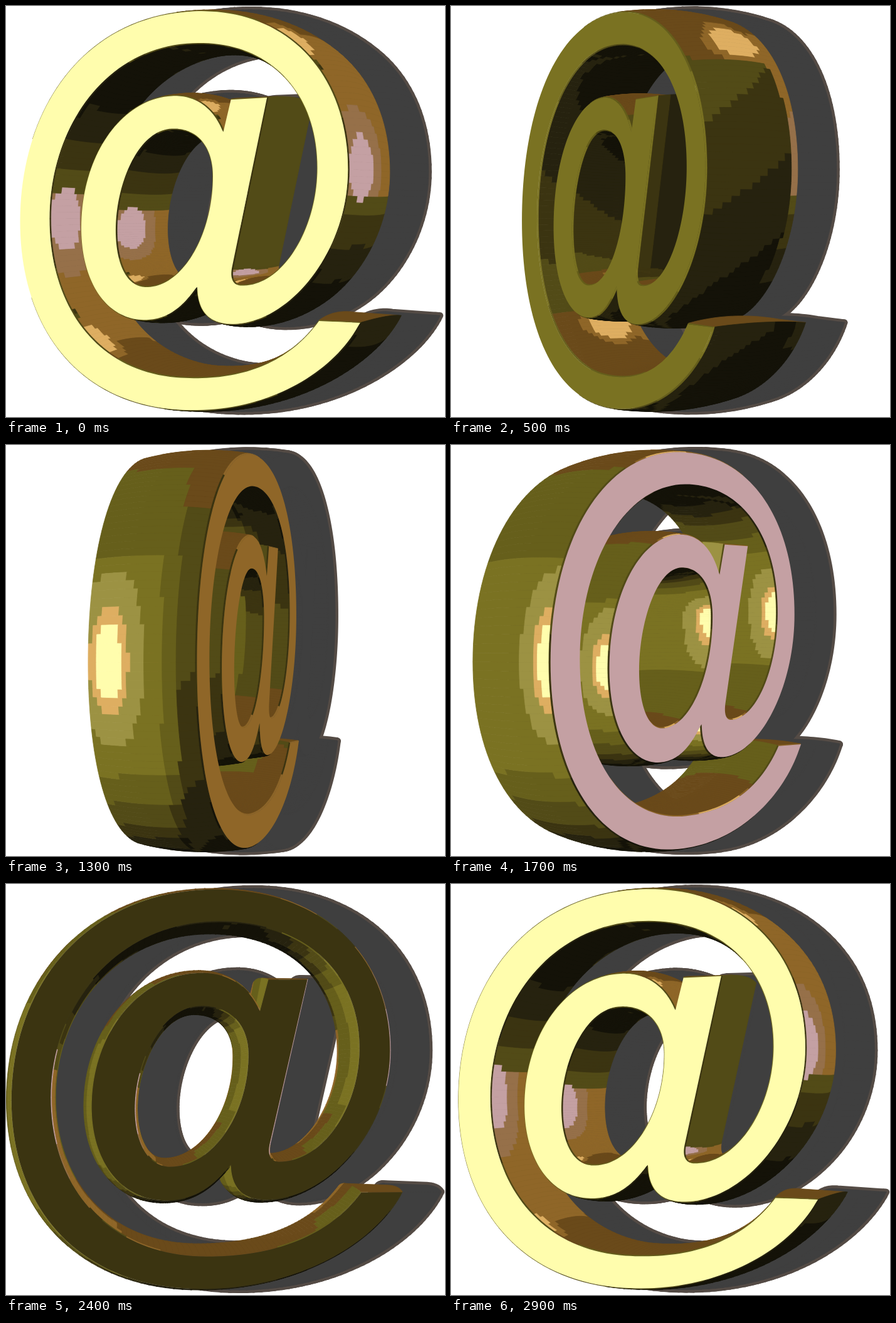
An HTML page with a canvas that plays this animation: 700 px wide and 655 px high, repeating every 3000 ms.

```html
<!DOCTYPE html>
<html lang="en">
<head>
<meta charset="utf-8">
<title>Turning at sign</title>
<style>
html, body { margin: 0; width: 100%; height: 100%; overflow: hidden; background: #fff; }
canvas { display: block; width: 700px; height: 655px; }
</style>
</head>
<body>
<canvas id="stage" width="700" height="655"></canvas>
<script>
const ctx = document.getElementById('stage').getContext('2d');
const RAD = Math.PI / 180;
const CX = 320, CY = 326, EYE = 2300, DEPTH = 80, RIM = 78, BULGE = 8;
const STRIPS = 24, CURVE_STEPS = 40;

// olive ramp from dark to light, then the warm tones
const OLIVE = ['#141208', '#26220f', '#3b3411', '#524b17', '#665f1b', '#7a7222'];
const KHAKI = '#9c9243', GOLD = '#deae61', CREAM = '#fffdad';
const UMBER = '#6a4a1a', BRONZE = '#8f6628', MAUVE = '#967049', PINK = '#c4a0a3';
const SHADE = '#3f3f3f', SHADE_EDGE = '#544b45';

// Outlines as seen with the sign turned by -7 degrees
const BODY = `M566 491 L632 491 C590 572 468 646 312 646 C120 646 8 520 8 345
  C8 160 130 8 335 8 C500 8 613 110 613 265 C613 395 510 504 415 504
  C378 504 359 485 358 448 C330 484 300 505 255 505 C185 505 136 445 136 355
  C136 235 215 141 312 141 C355 141 388 163 405 202 L418 152 L481 152 L421 415
  C417 434 424 442 436 442 C505 442 563 355 563 262 C563 140 475 60 340 60
  C180 60 72 190 72 340 C72 490 170 593 320 593 C430 593 515 560 566 491`;
const BOWL = `M312 195 C248 195 206 285 206 358 C206 412 226 450 262 450
  C330 450 386 365 386 272 C386 225 358 195 312 195`;

function sample(path) {
  const out = [];
  let last;
  for (const [, cmd, args] of path.matchAll(/([MLC])([^MLC]+)/g)) {
    const n = args.trim().split(/\s+/).map(Number);
    if (cmd === 'C') {
      for (let i = 1; i <= CURVE_STEPS; i++) {
        const t = i / CURVE_STEPS, s = 1 - t;
        const mix = k => s * s * s * last[k] + 3 * s * s * t * n[k] +
          3 * s * t * t * n[k + 2] + t * t * t * n[k + 4];
        out.push([mix(0), mix(1)]);
      }
    } else out.push(n);
    last = n.slice(-2);
  }
  out.pop();   // the last point repeats the first
  return out;
}

// Undo the view so the outline lies flat on the front plane
function flatten([x, y]) {
  const s = Math.sin(-7 * RAD), c = Math.cos(-7 * RAD), p = x - CX;
  const u = (p * (EYE - DEPTH * c) + EYE * DEPTH * s) / (EYE * c + p * s);
  return [u, (y - CY) * (EYE - u * s - DEPTH * c) / EYE];
}

function unit(x, y) {
  const l = Math.hypot(x, y) || 1;
  return [x / l, y / l];
}

// Slices along the depth; the sides swell in the middle like a barrel
const slices = Array.from({ length: STRIPS + 1 }, (_, k) => {
  const w = -DEPTH + (RIM + DEPTH) * k / STRIPS;
  return { w, out: BULGE * (1 - (w / DEPTH) ** 2) };
});

function makeLoop(path) {
  const p = sample(path).map(flatten), size = p.length;
  const normal = p.map((a, i) => {
    const b = p[(i + 1) % size];
    return unit(b[1] - a[1], a[0] - b[0]);
  });
  const shift = d => p.map((a, i) => {
    const m = normal[i], k = normal[(i + size - 1) % size];
    const n = unit(m[0] + k[0], m[1] + k[1]);
    return [a[0] + n[0] * d, a[1] + n[1] * d];
  });
  return { size, p, normal, cap: shift(-0.7), rings: slices.map(l => shift(l.out + 0.3)) };
}
const loops = [BODY, BOWL].map(makeLoop);

const wrap = a => ((a + 180) % 360 + 360) % 360 - 180;
const count = (v, limits) => limits.filter(l => v > l).length;

// Mirrored surroundings: az is the reflected heading, up the normal's lift
function tone(az, up) {
  const flare = Math.hypot((az - 72) / 22, (up - 0.75) / 0.1);
  if (flare < 1) return GOLD;
  if (flare < 1.4) return BRONZE;
  if (az > 88) {
    if (up > 0.82) return UMBER;
    const glow = Math.hypot((az - 106) / 14, up / 0.18);
    if (glow < 1) return PINK;
    if (up < -0.15) return OLIVE[3 - count(-up, [0.27, 0.45, 0.65])];
    return glow < 1.9 ? MAUVE : BRONZE;
  }
  if (az > -14) {
    if (up > 0.62) return UMBER;
    return OLIVE[3 - count((az - 44) / 150 - up, [-0.3, 0.2, 0.67])];
  }
  if (up > (az < -150 ? 0.5 : 0.85)) return UMBER;
  const spot = Math.hypot((az + 52) / 8, up / 0.14);
  if (spot < 1) return CREAM;
  if (spot < 1.45) return GOLD;
  if (spot < 2.5) return KHAKI;
  const base = az > -23 || az < -150 || up > 0.4 ? 4 : 5;
  return OLIVE[Math.max(0, base - count(-up, [0.5, 0.66, 0.8, 0.88, 0.95]))];
}

function trace(points) {
  points.forEach((p, i) => i ? ctx.lineTo(p[0], p[1]) : ctx.moveTo(p[0], p[1]));
  ctx.closePath();
}

function paint(shapes, color, width) {
  ctx.fillStyle = ctx.strokeStyle = color;
  ctx.lineWidth = width;
  ctx.beginPath();
  shapes.forEach(trace);
  ctx.fill();
  if (width) ctx.stroke();
}

// Positive when the corners run clockwise on screen
function area(q) {
  return q.reduce((sum, a, i) => {
    const b = q[(i + 1) % q.length];
    return sum + a[0] * b[1] - b[0] * a[1];
  }, 0);
}

function draw(deg) {
  const s = Math.sin(deg * RAD), c = Math.cos(deg * RAD);
  const project = ([u, v], w) => {
    const k = EYE / (EYE - u * s - w * c);
    return [CX + (u * c - w * s) * k, CY + v * k];
  };
  const shade = (n, tilt) => {
    const a = Math.cos(tilt * RAD), b = Math.sin(tilt * RAD);
    const x = n[0] * a * c - b * s, z = n[0] * a * s + b * c;
    return tone(wrap(2 * Math.atan2(x, z) / RAD), -n[1] * a);
  };

  const walls = [], rims = [];
  for (const { size, p, normal, cap, rings } of loops) {
    const grid = rings.map((ring, k) => ring.map(q => project(q, slices[k].w)));
    const front = cap.map(q => project(q, DEPTH));
    for (let i = 0; i < size; i++) {
      const j = (i + 1) % size, n = normal[i];
      const band = (k0, k1) => {
        const part = grid.slice(k0, k1 + 1);
        return part.map(g => g[j]).concat(part.map(g => g[i]).reverse());
      };
      const dist = Math.hypot((p[i][0] + p[j][0]) / 2 - EYE * s, (p[i][1] + p[j][1]) / 2);
      let first = STRIPS, end = 0;
      for (let k = 0; k < STRIPS; k++) {
        if (area([grid[k][i], grid[k][j], grid[k + 1][j], grid[k + 1][i]]) <= 0) continue;
        first = Math.min(first, k);
        end = k + 1;
      }
      if (first < end) walls.push({ shape: band(first, end), band, first, end, n, dist });
      const rim = [grid[STRIPS][i], grid[STRIPS][j], front[j], front[i]];
      if (area(rim) > 0) rims.push({ shape: rim, n, dist });
    }
  }
  const farFirst = (a, b) => b.dist - a.dist;
  walls.sort(farFirst);
  rims.sort(farFirst);
  const face = EYE * c > DEPTH ? loops.map(l => l.cap.map(q => project(q, DEPTH))) : [];

  ctx.fillStyle = '#fff';
  ctx.fillRect(0, 0, 700, 655);
  ctx.lineJoin = 'round';

  ctx.save();
  ctx.translate(62, 0);
  for (const [color, width] of [[SHADE_EDGE, 10], [SHADE, 0.8]]) {
    walls.concat(rims).forEach(q => paint([q.shape], color, width));
    paint(face, color, width);
  }
  ctx.restore();

  for (const { band, first, end, n } of walls) {
    let from = first, color = null;
    for (let k = first; k <= end; k++) {
      const mid = k < end ? (slices[k].w + slices[k + 1].w) / 2 : 0;
      const next = k < end ? shade(n, 15 * mid / DEPTH) : null;
      if (next === color) continue;
      if (color) paint([band(from, k)], color, 0.8);
      from = k;
      color = next;
    }
  }
  rims.forEach(q => paint([q.shape], shade(q.n, 45), 0.5));
  paint(face, tone(wrap(-2 * deg), 0), 0);
}

let shown = -1;
function tick(now) {
  const n = Math.floor(now / 100) % 30;
  if (n !== shown) {
    shown = n;
    const deg = 29 + 6 * n;
    draw(deg > 90 ? deg - 180 : deg);
  }
  requestAnimationFrame(tick);
}
tick(0);
</script>
</body>
</html>
```
